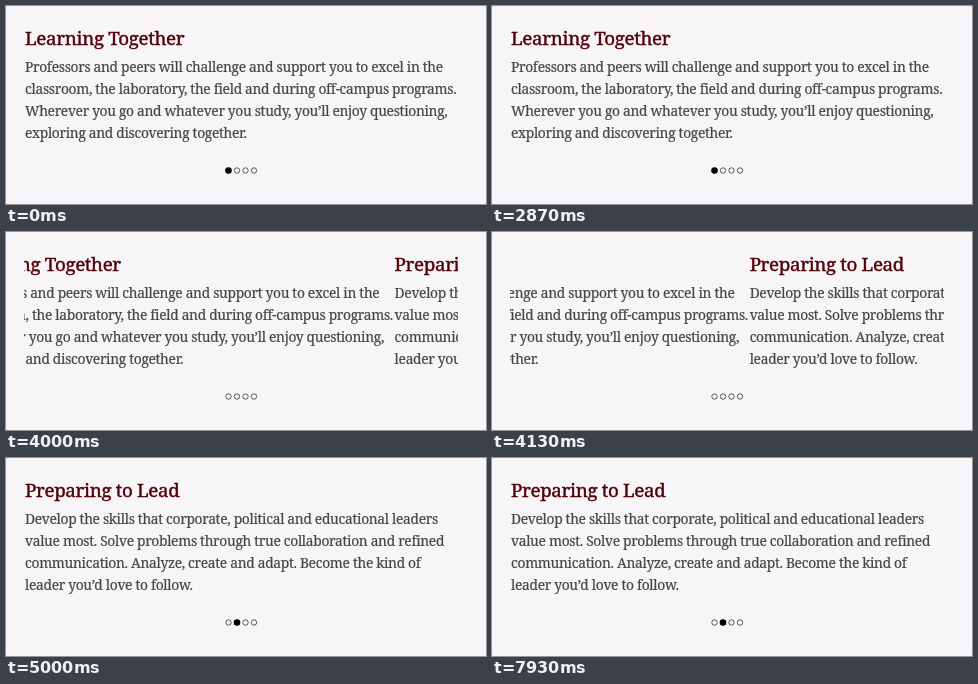
An HTML page for the animation above (8 s loop, 480x198 px).

```html
<!DOCTYPE html>
<html lang="en">
<head>
<meta charset="utf-8">
<title>Text carousel</title>
<style>
html, body { margin: 0; height: 100%; overflow: hidden; background: #d4d2d5; }
svg { display: block; width: 480px; height: 198px; }
text { font-family: "Noto Serif", serif; white-space: pre; }
.body { font-size: 13.8px; letter-spacing: -.31px; fill: #464447; stroke: #464447; stroke-width: .2; }
.title { font-size: 18.8px; letter-spacing: -.36px; fill: #520007; stroke: #520007; stroke-width: .4; }
circle { fill: none; stroke: #333; stroke-width: .8; }
circle.on { fill: #000; stroke: #000; stroke-width: 1.2; }
</style>
</head>
<body>
<svg viewBox="0 0 480 198">
  <clipPath id="view"><rect x="18" width="434" height="150"/></clipPath>
  <rect width="480" height="198" rx="2" fill="#f7f5f8"/>
  <g clip-path="url(#view)"><g id="track"></g></g>
  <g id="dots"></g>
</svg>
<script>
const LOOP = 8000, FPS = 15, SLIDE_WIDTH = 433;
const MOVE_START = 57.7, MOVE_LENGTH = 9.2; // in steps of 1/15 s
const slides = [
  ["Learning Together",
   "Professors and peers will challenge and support you to excel in the",
   "classroom, the laboratory, the field and during off-campus programs.",
   "Wherever you go and whatever you study, you’ll enjoy questioning,",
   "exploring and discovering together."],
  ["Preparing to Lead",
   "Develop the skills that corporate, political and educational leaders",
   "value most. Solve problems through true collaboration and refined",
   "communication. Analyze, create and adapt. Become the kind of",
   "leader you’d love to follow."]
];
const track = document.getElementById("track");
const dotRow = document.getElementById("dots");

function add(parent, tag, attrs, content = "") {
  const el = document.createElementNS("http://www.w3.org/2000/svg", tag);
  for (const key in attrs) el.setAttribute(key, attrs[key]);
  el.textContent = content;
  return parent.appendChild(el);
}

slides.forEach((lines, s) => lines.forEach((line, i) =>
  add(track, "text", {
    x: 19 + s * SLIDE_WIDTH,
    y: i ? 43.5 + i * 22 : 39,
    class: i ? "body" : "title"
  }, line)));

const dots = [0, 1, 2, 3].map(i =>
  add(dotRow, "circle", { cx: 222.5 + i * 8.5, cy: 164.5, r: 2.7 }));

function draw(now) {
  const step = Math.floor((now % LOOP + 4) * FPS / 1000);
  const p = Math.min(1, Math.max(0, (step - MOVE_START) / MOVE_LENGTH));
  const eased = (1 - Math.cos(Math.PI * p)) / 2;
  track.setAttribute("transform", `translate(${-SLIDE_WIDTH * eased})`);
  // No dot is filled while the slides move.
  dots.forEach((dot, i) => dot.classList.toggle("on", p === i));
  requestAnimationFrame(draw);
}
draw(performance.now());
</script>
</body>
</html>
```
